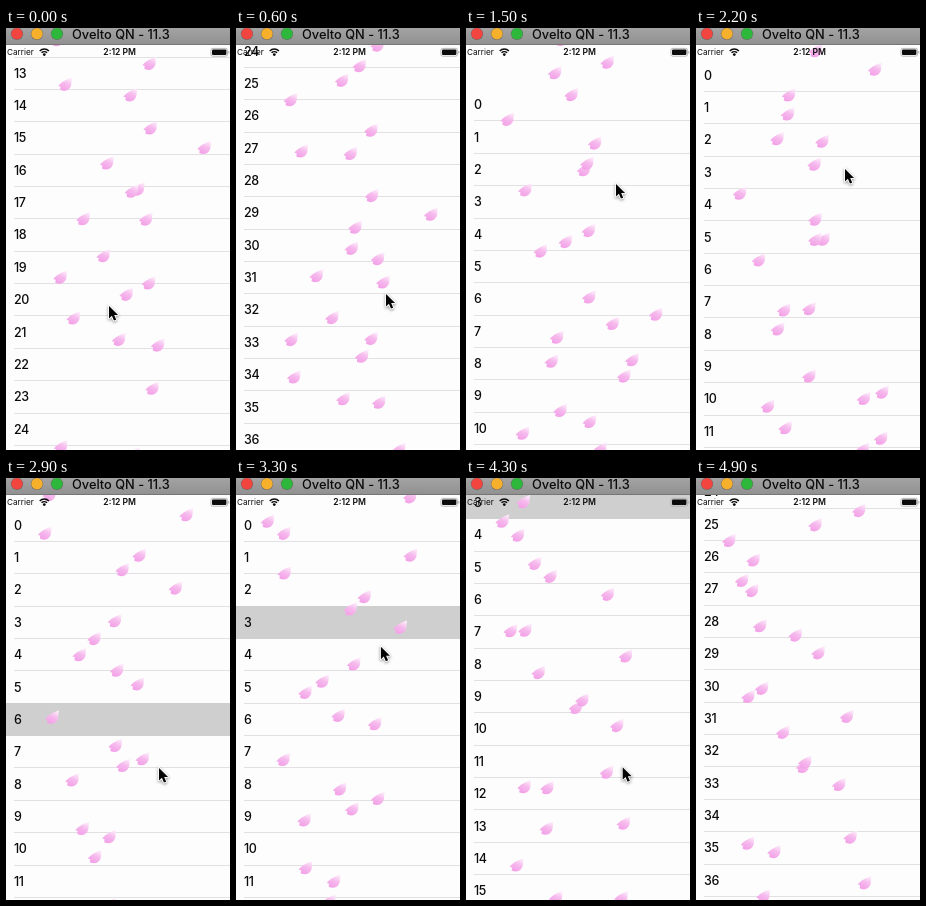
Animation of 224x422 px, one loop 5 s. Source, as an HTML page with a canvas:

```html
<!DOCTYPE html>
<html lang="en">
<head>
<meta charset="utf-8">
<title>Falling petals over a list</title>
<style>
  html, body { margin: 0; width: 100%; height: 100%; overflow: hidden; background: #fefdfe; }
  canvas { display: block; width: 224px; height: 422px; }
</style>
</head>
<body>
<canvas id="stage" width="224" height="422"></canvas>
<script>
const W = 224, H = 422, LOOP = 5000, STEP = 100;
const ROW_H = 32.36, LIST_TOP = 31.1;
const INK = '#0b0b0b';
const FONT = 'Inter, "Liberation Sans", sans-serif';
const ctx = document.getElementById('stage').getContext('2d');

const linear = k => k;
const easeOut = k => 1 - (1 - k) ** 2;

// Flicks, bounces and pulls of the list: [ms, offset]
const scroll = [[0, 422.7], [600, 800.8], [1500, -29.5], [2000, 0], [3300, 0], [3700, -57], [4250, 0], [4900, 810]];
// Mouse stops: [ms, x, y]
const pointer = [[0, 103, 278], [600, 150, 266], [1500, 150, 156], [2200, 149, 141],
  [2900, 153, 290], [3250, 146, 150], [3700, 136, 318], [4200, 140, 325], [4800, 240, 110]];

function at(keys, t, ease) {
  let i = 1;
  while (i < keys.length - 1 && keys[i][0] < t) i++;
  const a = keys[i - 1], b = keys[i];
  const k = ease(Math.min(1, (t - a[0]) / (b[0] - a[0])));
  return a.slice(1).map((v, n) => v + (b[n + 1] - v) * k);
}

function random(seed, lo, hi) {
  const n = Math.sin(seed * 12.9898 + 4.1) * 43758.5453;
  return lo + (hi - lo) * (n - Math.floor(n));
}

function rect(x, y, w, h, fill) {
  ctx.fillStyle = fill;
  ctx.fillRect(x, y, w, h);
}

function roundRect(x, y, w, h, r) {
  ctx.beginPath();
  ctx.roundRect(x, y, w, h, r);
}

function disc(x, y, r, fill) {
  ctx.fillStyle = fill;
  ctx.beginPath();
  ctx.arc(x, y, r, 0, 7);
  ctx.fill();
}

function label(str, x, y, size, weight = 400, spacing = 0) {
  ctx.font = `${weight} ${size}px ${FONT}`;
  ctx.letterSpacing = `${spacing}px`;
  ctx.fillStyle = INK;
  ctx.fillText(str, x, y);
}

function drawRows(t) {
  const [offset] = at(scroll, t, easeOut);
  const selected = t < 2700 ? -1 : t < 3250 ? 6 : 3;
  for (let i = 0; i < 50; i++) {
    const top = LIST_TOP + i * ROW_H - offset;
    const line = Math.floor(top + ROW_H);
    rect(8, line, W - 8, 1, '#e2e0e2');
    if (i === selected) rect(0, Math.floor(top), W, line + 1 - Math.floor(top), '#d0cfd0');
    label(String(i), 8, top + 20.6, 12.5, 500, -.4);
  }
}

const petalFill = ctx.createLinearGradient(-2, 5, 4, -7);
petalFill.addColorStop(0, '#f3a4e8');
petalFill.addColorStop(.5, '#f6bbed');
petalFill.addColorStop(1, '#fdeefb');

function drawPetal(x, y) {
  ctx.save();
  ctx.translate(x, y);
  ctx.fillStyle = petalFill;
  ctx.beginPath();
  ctx.moveTo(7, -7);
  ctx.bezierCurveTo(2.5, -5.5, -3, -3.5, -7, 1.5);
  ctx.lineTo(-4.6, 2.2);
  ctx.lineTo(-5, 5.2);
  ctx.bezierCurveTo(-1, 7.6, 4.5, 6, 6, 1);
  ctx.bezierCurveTo(6.6, -1.5, 6.2, -4, 7, -7);
  ctx.fill();
  ctx.restore();
}

// One petal every GAP ms, each falling on its own straight line
const GAP = 189.5, LEAD = 220, SPAWN_Y = -10;

function drawPetals(t) {
  const newest = Math.floor((t + LEAD) / GAP);
  for (let i = newest - 25; i <= newest; i++) {
    const age = (t + LEAD - i * GAP) / 1000;
    const y = SPAWN_Y + age * random(i, 92, 113);
    const from = random(i + .3, 22, 205), to = random(i + .6, 40, 190);
    drawPetal(from + (to - from) * y / H, y);
  }
}

function drawStatus() {
  label('Carrier', 1, 27.3, 8.2);
  label('2:12 PM', 97.3, 27.3, 8.6, 600);
  ctx.strokeStyle = INK;
  ctx.lineWidth = 1.5;
  for (const r of [3.9, 6.5]) {
    ctx.beginPath();
    ctx.arc(38.3, 27.6, r, -Math.PI * .75, -Math.PI * .25);
    ctx.stroke();
  }
  disc(38.3, 26.6, 1.4, INK);
  ctx.strokeStyle = '#aaa9aa';
  ctx.lineWidth = .8;
  roundRect(204.9, 20.4, 16.6, 7.8, 1.8);
  ctx.stroke();
  ctx.fillStyle = INK;
  roundRect(206, 21.5, 14.4, 5.6, 1);
  ctx.fill();
  rect(222.3, 23, 1, 2.6, '#aaa9aa');
}

const barFill = ctx.createLinearGradient(0, 0, 0, 16);
barFill.addColorStop(0, '#a4a3a4');
barFill.addColorStop(1, '#929192');

function drawTitleBar() {
  rect(0, 0, W, 16, barFill);
  rect(0, 16, W, 1, '#777677');
  ['#f2453f', '#f6b02c', '#2eb83b'].forEach((colour, i) => {
    disc(11 + i * 20, 5.8, 6.2, 'rgba(0, 0, 0, .3)');
    disc(11 + i * 20, 5.8, 5.7, colour);
  });
  label('Ovelto QN - 11.3', 66, 11, 12.8, 500);
}

function drawPointer(t) {
  const [x, y] = at(pointer, t, linear);
  ctx.save();
  ctx.translate(x, y);
  ctx.scale(.88, .88);
  ctx.beginPath();
  [[0, 0], [0, 14.2], [3.3, 11.2], [5.6, 16.6], [8.2, 15.5], [5.9, 10.3], [10.3, 10.2]]
    .forEach(p => ctx.lineTo(...p));
  ctx.closePath();
  ctx.lineJoin = 'round';
  ctx.lineWidth = 2;
  ctx.strokeStyle = '#fff';
  ctx.shadowColor = 'rgba(0, 0, 0, .45)';
  ctx.shadowBlur = 3;
  ctx.shadowOffsetY = 1;
  ctx.stroke();
  ctx.shadowColor = 'transparent';
  ctx.fillStyle = '#050505';
  ctx.fill();
  ctx.restore();
}

function draw(t) {
  rect(0, 0, W, H, '#fefdfe');
  drawRows(t);
  drawPetals(t);
  drawStatus();
  drawTitleBar();
  drawPointer(t);
}

const start = performance.now();
function tick() {
  const t = (performance.now() - start) % LOOP;
  draw(Math.floor(t / STEP) * STEP);
  requestAnimationFrame(tick);
}
tick();
</script>
</body>
</html>
```
